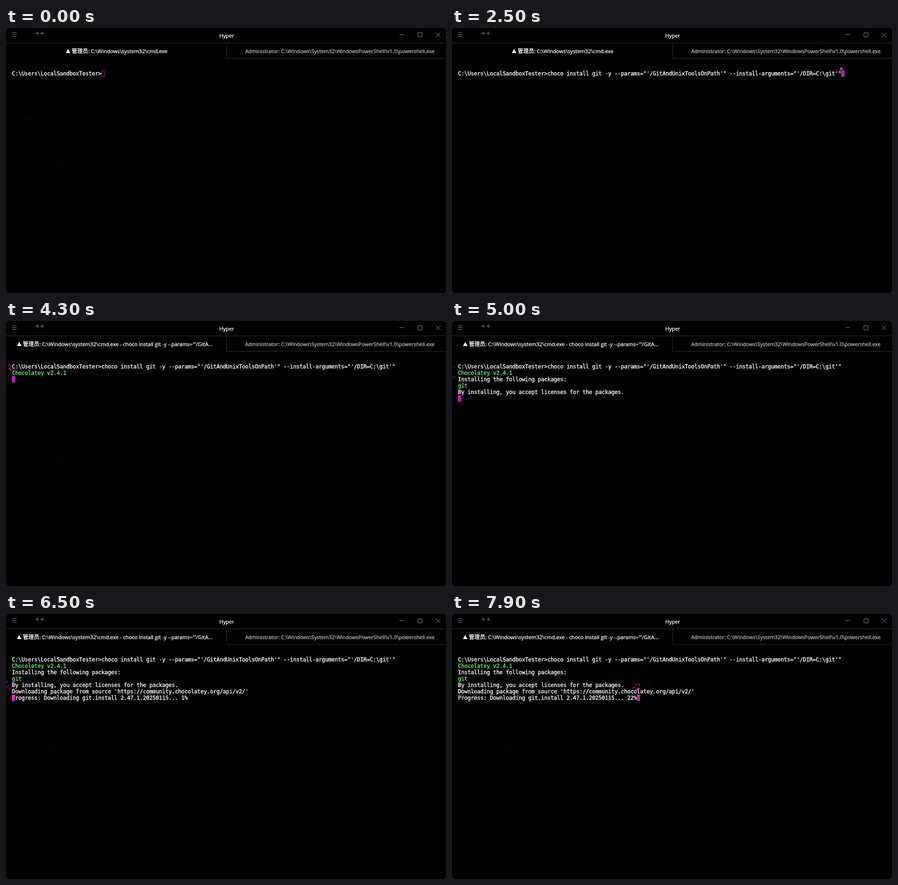
An HTML page with a canvas that plays this animation: 964x581 px, repeating every 8 s.

```html
<!DOCTYPE html>
<html lang="en">
<head>
<meta charset="utf-8">
<title>Terminal</title>
<style>
  html, body { margin: 0; width: 100%; height: 100%; overflow: hidden; background: #000; }
  canvas { display: block; }
</style>
</head>
<body>
<canvas id="stage" width="964" height="581"></canvas>
<script>
const ctx = document.getElementById('stage').getContext('2d', { alpha: false });
const W = 964, H = 581, LOOP = 8000, STEP = 100;
const LEFT = 13, TOP = 93, CELL = 7, ROW = 14;
const MONO = '12px "DejaVu Sans Mono", monospace';
const UI = '11.3px "Open Sans", sans-serif';
const BOLDER = '500 11.5px "Open Sans", sans-serif';
const CJK = '500 12px "Noto Sans CJK SC", "Noto Sans CJK", sans-serif';
const WHITE = '#fff', GREEN = '#67f86f', GRAY = '#8c8c8c', PINK = '248,28,229';

const CMD = String.raw`choco install git -y --params="'/GitAndUnixToolsOnPath'" --install-arguments="'/DIR=C:\git'"`;
const CMD_TAB = String.raw`: C:\Windows\system32\cmd.exe`;
const PS_TAB = String.raw`Administrator: C:\Windows\System32\WindowsPowerShell\v1.0\powershell.exe`;
const PROGRESS = '\rProgress: Downloading git.install 2.47.1.20250115... ';

// what the terminal receives, and when
const output = [
  [0, String.raw`C:\Users\LocalSandboxTester>`],
  [1600, CMD],
  [2800, '\n'],
  [3900, 'Chocolatey v2.4.1\n', GREEN],
  [4600, 'Installing the following packages:\n'],
  [4600, 'git\n', GREEN],
  [4600, 'By installing, you accept licenses for the packages.\n'],
  [5600, "Downloading package from source 'https://community.chocolatey.org/api/v2/'\n"],
  [6500, PROGRESS + '1%\r'],
  [6600, PROGRESS + '1%'],
  [7800, PROGRESS + '22%'],
];

// moments at which the cursor throws sparks
const hits = [1600, 2500, 2800, 3900, 4200, 4600, 5600, 6300, 6700, 7000, 7200, 7800];

function seeded(seed) {
  const next = () => (seed = (seed * 16807) % 2147483647) / 2147483647;
  for (let i = 0; i < 4; i++) next();
  return (min, max) => min + next() * (max - min);
}

const many = (count, make) => Array.from({ length: count }, make);

const rnd = seeded(29);
const bursts = hits.map(hit => ({
  hit,
  sparks: many(Math.round(rnd(5, 8)), () => ({ vx: rnd(-1, 1), vy: rnd(-3.5, -1.5) })),
}));

// faint specks left on the screen; the upper ones go when the command appears
const upper = many(5, () => [rnd(0, 60), rnd(188, 243)]);
const lower = many(8, () => [rnd(30, 126), rnd(268, 359)]);

// replays the output up to time t into a grid of cells
function terminal(t) {
  const cells = {};
  let row = 0, col = 0;
  for (const [start, text, color = WHITE] of output) {
    if (start > t) break;
    for (const ch of text) {
      if (ch === '\n') { row++; col = 0; }
      else if (ch === '\r') col = 0;
      else cells[row + ',' + col] = { ch, color, x: LEFT + CELL * col++, y: TOP + ROW * row };
    }
  }
  return { cells: Object.values(cells), x: LEFT + CELL * col, y: TOP + ROW * row };
}

function rect(x, y, w, h, fill) {
  ctx.fillStyle = fill;
  ctx.fillRect(x, y, w, h);
}

// a hairline outline gives the text its firm weight
function label(text, x, y, font, color, align = 'left') {
  ctx.font = font;
  ctx.textAlign = align;
  ctx.fillStyle = ctx.strokeStyle = color;
  ctx.lineWidth = .35;
  ctx.lineJoin = 'round';
  ctx.fillText(text, x, y);
  ctx.strokeText(text, x, y);
}

function line(x1, y1, x2, y2) {
  ctx.strokeStyle = GRAY;
  ctx.lineWidth = 1;
  ctx.beginPath();
  ctx.moveTo(x1, y1);
  ctx.lineTo(x2, y2);
  ctx.stroke();
}

function plus(x, y) {
  line(x - 4, y, x + 4, y);
  line(x, y - 4, x, y + 4);
}

function drawTab(x, text) {
  ctx.fillStyle = WHITE;
  ctx.beginPath();
  ctx.moveTo(x, 55);
  ctx.lineTo(x + 5, 46);
  ctx.lineTo(x + 10, 55);
  ctx.fill();
  label('管理员', x + 13, 55, CJK, WHITE);
  label(text, x + 49, 55, BOLDER, WHITE);
}

function drawChrome(t) {
  for (const y of [10.5, 14.5, 18.5]) line(13, y, 23, y);
  plus(68.5, 11.5);
  plus(79.5, 11.5);
  line(862, 14.5, 872, 14.5);
  ctx.strokeRect(902.5, 10.5, 9, 9);
  line(942, 10, 952, 20);
  line(952, 10, 942, 20);
  label('Hyper', 483.5, 21, BOLDER, WHITE, 'center');
  rect(0, 32, W, 1, '#333');
  rect(483, 33, 1, 34, '#333');
  rect(483, 66, W - 483, 1, '#333');
  label(PS_TAB, 731.5, 55, UI, '#bcbcbc', 'center');
  if (t < 2900) drawTab(131, CMD_TAB);
  else drawTab(24, CMD_TAB + ' - ' + CMD.slice(0, 37) + '...');
}

function drawCursor(t, { x, y }) {
  rect(x, y, CELL, ROW, `rgba(${PINK},.8)`);
  if (t < 400) rect(x + 1, y + 1, CELL - 2, ROW - 2, '#000');
}

// 60 ticks a second: gravity pulls the sparks down, each tick dims them by 4%
function drawBurst(t, { hit, sparks }) {
  const n = Math.round((t - hit) * .06) + 2;
  const alpha = .96 ** n;
  if (t < hit || alpha < .1) return;
  const from = terminal(hit);
  for (const { vx, vy } of sparks) {
    const x = from.x + vx * n;
    const y = from.y + vy * n + .0375 * n * (n + 1);
    rect(Math.round(x - 1), Math.round(y - 1), 3, 3, `rgba(${PINK},${alpha})`);
  }
}

function draw(t) {
  rect(0, 0, W, H, '#aaa');
  ctx.fillStyle = '#000';
  ctx.beginPath();
  ctx.roundRect(0, 0, W, H, 3);
  ctx.fill();

  const specks = t < 1600 ? [...upper, ...lower] : lower;
  for (const [x, y] of specks) rect(Math.round(x) - 1, Math.round(y) - 1, 3, 3, '#1e0010');
  drawChrome(t);
  const screen = terminal(t);
  for (const { ch, color, x, y } of screen.cells) {
    if (ch !== ' ') label(ch, x, y + 11, MONO, color);
  }
  drawCursor(t, screen);
  for (const burst of bursts) drawBurst(t, burst);
}

let shown = -1;
function tick() {
  const t = Math.floor(performance.now() % LOOP / STEP) * STEP;
  if (t !== shown) draw(shown = t);
  requestAnimationFrame(tick);
}
tick();
</script>
</body>
</html>
```
